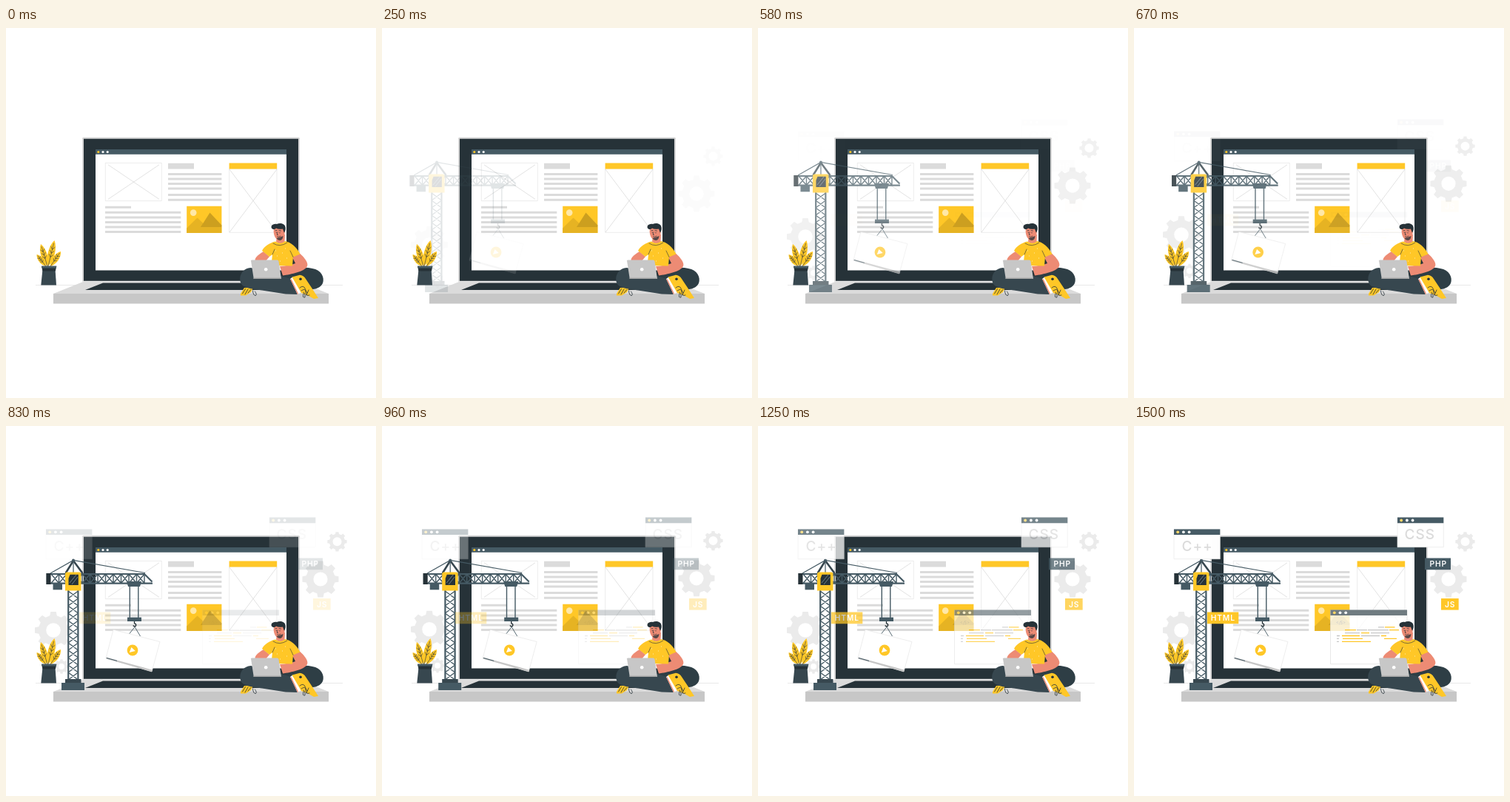
These frames come from a looping animation (500x500 px, 1.54 s). An HTML page:

```html
<!DOCTYPE html>
<html lang="en">
<head>
<meta charset="utf-8">
<title>Website under construction</title>
<style>
html, body { margin: 0; width: 100%; height: 100%; overflow: hidden; background: #fff; }
svg { display: block; width: 100%; height: 100%; }
text { font-family: Inter, sans-serif; }
.big { font-size: 19px; font-weight: 500; letter-spacing: 1px; fill: #dbdbdb; }
.tag { font-size: 10.3px; font-weight: 600; letter-spacing: .8px; fill: #fff; }
.steel { fill: #455a64; }
.line { fill: none; stroke: #455a64; }
.ink { fill: none; stroke: #263238; stroke-width: .8; stroke-linecap: round; }
.wire { fill: none; stroke: #e0e0e0; stroke-width: .6; }
.gold { fill: #ffc727; }
.skin { fill: #ed8b74; }
</style>
</head>
<body>
<svg viewBox="0 0 500 500">
  <path d="M40 347.5H455" stroke="#e0e0e0" stroke-width=".7"/>
  <g id="gears" fill="#ebebeb" fill-rule="evenodd"></g>

  <!-- big laptop -->
  <path d="M64 359L104 343H396L436 359Z" fill="#dbdbdb"/>
  <path d="M64 359H436V372.5H64Z" fill="#c7c7c7"/>
  <path d="M107 354L131 344.5H372L394 354Z" fill="#263238"/>
  <path d="M103 342.5V149.5Q103 147.8 105 147.8H395Q397 147.8 397 149.5V342.5Z" fill="#d6d6d6"/>
  <path d="M105 149.8H395V341.8H105Z" fill="#263238"/>
  <path d="M121 164H379V327.5H121Z" fill="#fff"/>
  <path d="M121 164H379V170.7H121Z" class="steel"/>
  <circle cx="124.8" cy="167.5" r="1.6" class="gold"/>
  <circle cx="131" cy="167.5" r="1.6" fill="#fff"/>
  <circle cx="137.2" cy="167.5" r="1.6" fill="#fff"/>

  <!-- page layout -->
  <path class="wire" d="M134.3 182.4H210.3V233.6H134.3Z"/>
  <path class="wire" style="stroke:#cfcfcf" d="M138 184.8L207 231.4M207 184.8L138 231.4"/>
  <path class="wire" d="M301.7 190H366V276.3H301.7Z"/>
  <path class="wire" style="stroke:#cfcfcf" d="M302 191L366 276M366 191L302 276"/>
  <path d="M301.6 182.5H366.2V190.4H301.6Z" class="gold"/>
  <path d="M219 182.7H254V190.4H219Z" fill="#dbdbdb"/>
  <path id="copy" stroke="#dbdbdb" stroke-width="3"/>
  <path d="M244.2 240.8H291.4V277H244.2Z" class="gold"/>
  <circle cx="253.2" cy="249.6" r="4.3" fill="#ffe8a8"/>
  <path d="M244.2 270.5L258.5 256.5L272 269H291.4V277H244.2Z" fill="#e6b323"/>
  <path d="M263 269L275.5 249.5L291.4 266.5V269Z" fill="#cc9f1f"/>

  <!-- crane and its load -->
  <g id="crane">
    <path id="truss" class="line" stroke-width="1.4"/>
    <path class="line" stroke-width="2.2" d="M84.2 221V343M97.4 221V343M56 200H187L197.5 210.5M56 212.7H198"/>
    <path class="line" stroke-width="1.2" d="M60 199L91 181.5L188 198.5"/>
    <path d="M80.5 199L91 182L103.5 199" fill="none" stroke="#37474f" stroke-width="2.6"/>
    <path d="M91 182V199" class="line" stroke-width="1.2"/>
    <circle cx="91" cy="181.5" r="2" class="steel"/>
    <path d="M54.3 199H60.5V214H54.3Z" fill="#263238"/>
    <path d="M63.5 213H76V221.3H63.5Z" class="steel"/>
    <path d="M82 197.5H99.5Q101.5 197.5 101.5 200V222.6H80V200Q80 197.5 82 197.5Z" class="gold"/>
    <path d="M86.5 200.8H97.8V215H84.5V206Z" fill="#263238"/>
    <path d="M86 212L95 201M89 214L97 204" stroke="#6e7f87" stroke-width="1"/>
    <path d="M80 342H101.5V347.5H80Z" fill="#37474f"/>
    <path d="M75 347H106V357H75Z" class="steel"/>
    <path d="M163 210H183L181 217H165Z" class="steel"/>
    <path class="line" stroke-width="1.4" d="M167.3 216V260M178.8 216V260"/>
    <path d="M164 258.6H183V264H164Z" class="steel"/>
    <path class="line" style="stroke:#263238" stroke-width="1.4" d="M173.5 264V266.5Q177 268 175 270.5Q172.5 271.5 172 269.3"/>
    <path class="line" stroke-width=".9" d="M181.5 284L174 271.5L166.5 281"/>
    <path d="M145 275.3L208 291.5L197 332L135 313.8Z" fill="#fff" stroke="#e6e6e6" stroke-width=".7"/>
    <path d="M135.4 312.4L197.6 329.6L197 332L135 314.6Z" fill="#c7c7c7"/>
    <path d="M136 313.5L150 317.4" stroke="#455a64" stroke-width="1"/>
    <circle cx="171" cy="303" r="7.4" class="gold"/>
    <path d="M169.4 299L174.8 304L166.8 306Z" fill="#fff"/>
  </g>

  <!-- plant -->
  <g id="leaves"></g>
  <path d="M49.5 326H66.5L68 347.5H47.3Z" fill="#37474f"/>
  <path d="M48 321.8H68.3L66.8 328.5H49.5Z" fill="#263238"/>
  <path d="M48 321.8H68.3L67.7 324.6H48.5Z" class="steel"/>

  <!-- floating windows and tags -->
  <g id="panels">
    <path d="M54 139.5H116.3V179.7H54Z" fill="#fff" stroke="#e8e8e8" stroke-width=".7"/>
    <path d="M54 139.4H116.3V147H54Z" class="steel"/>
    <path d="M356 123.7H418.3V163.7H356Z" fill="#fff" stroke="#e8e8e8" stroke-width=".7"/>
    <path d="M356 123.6H418.3V131.2H356Z" class="steel"/>
    <path d="M265.5 249H369V321.7H265.5Z" fill="#fff" fill-opacity=".8" stroke="#dedede" stroke-width=".7"/>
    <path d="M265.5 248.6H369V256H265.5Z" fill="#6f7b81"/>
    <g id="dots"></g>
    <text class="big" x="64.5" y="169">C++</text>
    <text class="big" x="365.5" y="153">CSS</text>
    <path d="M99 251.5H141.3V267.3H99Z" class="gold"/>
    <text class="tag" x="103.8" y="263.2">HTML</text>
    <path d="M393 178.5H428V194.3H393Z" class="steel"/>
    <text class="tag" x="399.6" y="190.2">PHP</text>
    <path d="M415 233H438.7V248.6H415Z" class="gold"/>
    <text class="tag" x="420" y="244.6">JS</text>
    <text x="273" y="268.2" font-size="5.5" fill="#c9c9c9">&lt;/S&gt;</text>
    <path stroke="#c7c7c7" stroke-width="1.3" d="M330 271.8H338M301 275.7H315M316 275.7H344M285 279.6H305M320 279.6H345M274 283.5H278M307 283.5H332M274 287.4H277M274 291.3H277"/>
    <path stroke="#ffc727" stroke-width="1.3" d="M339 271.8H352.5M285 275.7H300M345 275.7H358M307 279.6H318M281 283.5H305M334 283.5H341M282 287.4H309M338 287.4H355M281 291.4H320"/>
  </g>

  <!-- developer -->
  <path d="M317 359L322 351H334L331 357L324 361.5H317Z" class="gold"/>
  <path class="ink" d="M319.5 359L323.5 352.5M323 360L327 353M327 358L331 353.5M333.5 355Q334 362 337.5 361.5Q339.5 360 336.5 356"/>
  <path d="M373 337L392 325Q404 322.5 414 325C426 327 431 337 428 345C424 354 411 354 402 352Z" fill="#2e3e45"/>
  <path d="M331 324C318 325 314 337 317.5 345C321 352.5 335 352.5 346 354.5L378 359.5L394 360L385 339L372 335Z" fill="#37474f"/>
  <path d="M384 339L387.5 336.5L399 357L394 360Z" fill="#fff"/>
  <path d="M385 339.5L394.5 359.5" stroke="#ed8b74" stroke-width="1.4"/>
  <path d="M386.5 336.5L397 333.8Q402 334 405 339L413 351L422 365L416 366Q408 361 399 358Z" class="gold"/>
  <circle cx="398" cy="339.2" r="1.8" fill="#263238"/>
  <path class="ink" d="M397 351Q402 347 404 352T407 358M399 355Q405 351 405 357T410 361M402 359Q400 365 404 364Q405 360 402 357M409 354L406 361"/>
  <path class="skin" d="M348 302L356 309L350 316L337 316Q334 310 348 302Z"/>
  <path class="skin" d="M386 308L397 304.5C403 310 409 317 407 322C404 329 385 333 374 334.5L370 322Q383 321 391 318Z"/>
  <path class="gold" d="M364 288.5C356 290.5 349 295 346 301L356 309L360 306L358.5 321L387 321.5L388 309.5L397.5 305.5C393 296 384 289 377 288Q371 292 364 288.5Z"/>
  <path class="ink" style="stroke-width:.6" d="M360 306L363 299M388 309.5L384 301M361 291Q370 297 380 290"/>
  <path d="M366 308h.8M373 304h.8M379 311h.8M370 315h.8M364 301h.8M377 298h.8" stroke="#fff" stroke-width=".8"/>
  <path class="skin" d="M366 281L377 279L376.5 288.5Q371 293 365 288.8Z"/>
  <path class="skin" d="M362 270C360.5 279 364 286.5 369.5 286.5C375 286 377.5 279 376.8 270Z"/>
  <path d="M360 271.5C356 268 361 263.5 366 265C370 262.5 377 264.5 377.4 268.5C378.5 272 376.8 276 375.8 276.5L374 271.5Q368 272.5 365 270.5Q363 273 360 271.5Z" fill="#263238"/>
  <path d="M365.5 284Q370 283 374.5 281Q374 287 369.5 287Q367 287 365.5 284Z" fill="#263238" fill-opacity=".75"/>
  <path class="ink" style="stroke-width:.7" d="M364 273.8L366 273.4M369 273.6L371.5 274M365.3 276v.8M370 276.2v.8M367 276L366.3 279.5H367.5M366.5 282Q369 283 371 281.2"/>
  <path d="M331 314.5Q331 313.4 332.5 313.4H366.5Q368.2 313.4 368.5 315L372 339H334.8Z" fill="#c7c7c7"/>
  <path d="M334.5 338.2H372" stroke="#a6a6a6" stroke-width="1.4"/>
  <circle cx="351.2" cy="326.2" r="2.3" fill="#fff"/>
</svg>
<script>
const LOOP = 1540;
const el = id => document.getElementById(id);

function gear(cx, cy, r, hole, teeth = 8) {
  const step = 2 * Math.PI / teeth, pts = [];
  const corners = [[-.3, .8], [-.19, 1], [.19, 1], [.3, .8]];
  for (let i = 0; i < teeth; i++) {
    for (const [a, k] of corners) {
      const ang = (i + a) * step;
      pts.push((cx + r * k * Math.cos(ang)).toFixed(2) + " " + (cy + r * k * Math.sin(ang)).toFixed(2));
    }
  }
  return `<path d="M${pts.join("L")}ZM${cx - hole} ${cy}a${hole} ${hole} 0 1 0 ${2 * hole} 0a${hole} ${hole} 0 1 0 ${-2 * hole} 0Z"/>`;
}

function truss() {
  let d = "";
  for (let y = 223; y < 342; y += 10) d += `M84 ${y}L97.5 ${y + 10}M97.5 ${y}L84 ${y + 10}`;
  for (let x = 61; x < 185; x += 10.5) {
    const end = x + 10.5;
    d += `M${x} 200L${end} 212.5M${end} 200L${x} 212.5M${end} 200V212.5`;
  }
  return d;
}

// A pointed leaf from its root to its tip, with a midrib and side veins.
function leaf(x, y, tx, ty, w) {
  const dx = tx - x, dy = ty - y, len = Math.hypot(dx, dy);
  const nx = -dy / len * w, ny = dx / len * w;
  const at = (k, s) => `${x + dx * k + nx * s} ${y + dy * k + ny * s}`;
  let veins = `M${at(0, 0)}L${at(.88, 0)}`;
  for (const k of [.35, .5, .65]) veins += `M${at(k + .1, .6)}L${at(k, 0)}L${at(k + .1, -.6)}`;
  return `<path class="gold" d="M${at(0, 0)}C${at(.3, 1.4)} ${at(.75, 1.3)} ${at(1, 0)}C${at(.75, -1.3)} ${at(.3, -1.4)} ${at(0, 0)}Z"/>
    <path class="ink" style="stroke-width:.6" d="${veins}"/>`;
}

const rows = (x1, x2, ys) => ys.map(y => `M${x1} ${y}H${x2}`).join("");
const dots = (x, y) => [0, 1, 2].map(i =>
  `<circle cx="${x + i * 7.7}" cy="${y}" r="1.9" fill="${i ? "#fff" : "#ffd866"}"/>`).join("");

el("gears").innerHTML = gear(425, 207, 24.8, 9.6) + gear(447.5, 156.3, 13.3, 6) +
  gear(64, 276, 25.3, 9.8) + gear(75, 325, 9.8, 4);
el("truss").setAttribute("d", truss());
el("copy").setAttribute("d", rows(219, 291.4, [197.4, 204, 210.4, 217, 225.6, 232.3]) +
  rows(134, 169, [242.2]) + rows(134, 236.3, [249.3, 256, 262.5, 269, 275.5]));
el("leaves").innerHTML = leaf(57, 322, 65.5, 287, 4.6) + leaf(56, 322, 47, 292, 4.2) +
  leaf(60, 322, 74, 302, 4) + leaf(54, 322, 41.5, 306, 3.4);
el("dots").innerHTML = dots(59.2, 143.3) + dots(361.2, 127.5) + dots(270.8, 252.3);

// cubic-bezier(.36, -.01, .5, 1.38): eases in, then overshoots a little
function ease(p) {
  if (p <= 0) return 0;
  if (p >= 1) return 1;
  const curve = (s, a, b) => 3 * (1 - s) * (1 - s) * s * a + 3 * (1 - s) * s * s * b + s * s * s;
  let lo = 0, hi = 1;
  for (let i = 0; i < 24; i++) {
    const mid = (lo + hi) / 2;
    if (curve(mid, .36, .5) < p) lo = mid; else hi = mid;
  }
  return curve(lo, -.01, 1.38);
}

const fade = (id, k) => el(id).setAttribute("opacity", Math.min(1, Math.max(0, k)).toFixed(3));
const shift = (id, x, y) => el(id).setAttribute("transform", `translate(${x.toFixed(2)} ${y.toFixed(2)})`);

function draw(t) {
  const slide = ease(t / 1220), show = ease((t - 545) / 1420);
  fade("crane", slide);
  shift("crane", 20 * (slide - 1), 0);
  fade("gears", slide);
  shift("gears", 0, 20 * (1 - slide));
  fade("panels", show);
}

const start = performance.now();
function tick() {
  draw((performance.now() - start) % LOOP);
  requestAnimationFrame(tick);
}
draw(0);
requestAnimationFrame(tick);
</script>
</body>
</html>
```
